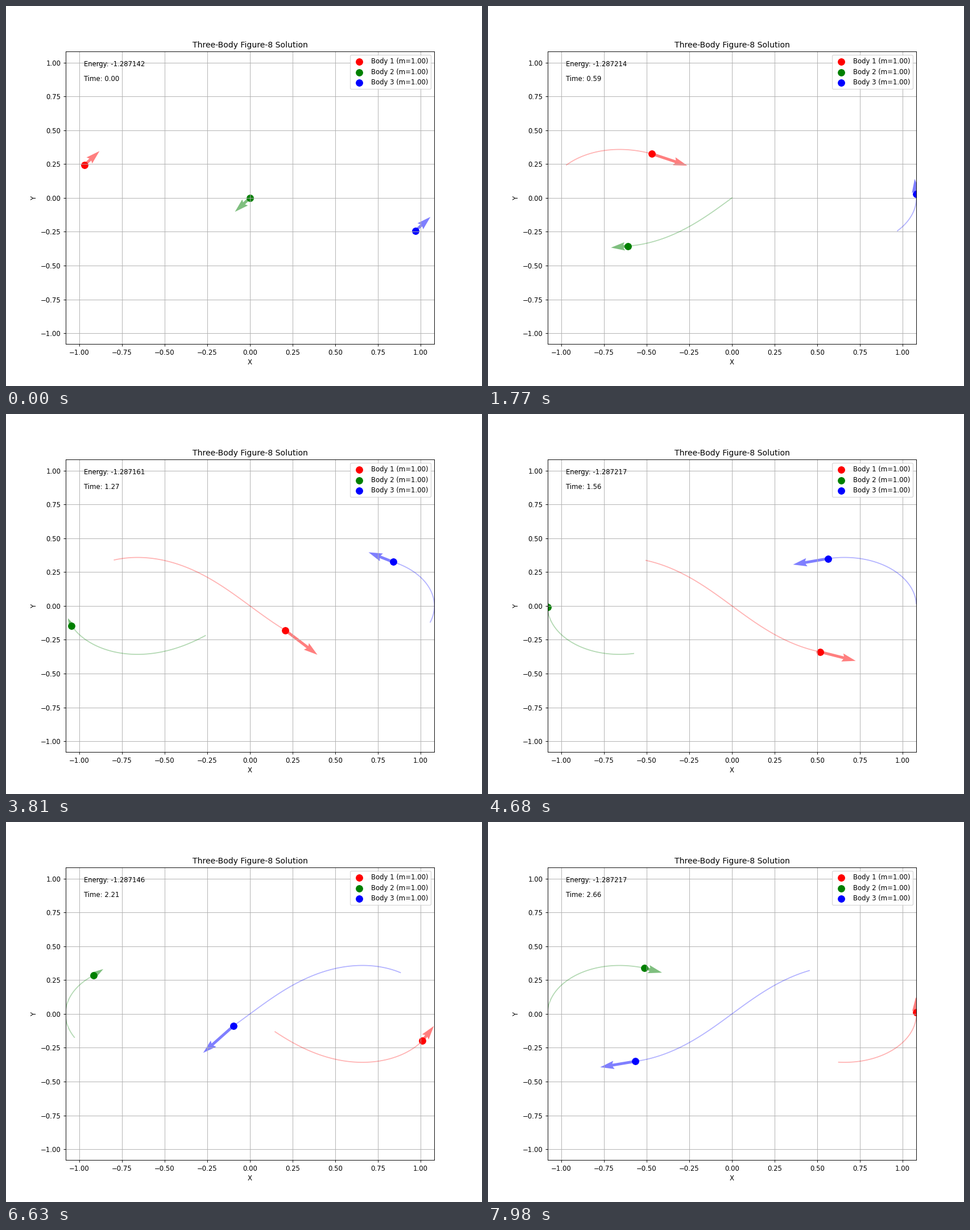
A matplotlib script that plays this animation: 837 by 669 pixels, repeating every 8000 ms.

```python
import numpy as np
import matplotlib.pyplot as plt
from matplotlib.animation import FuncAnimation

WIDTH, HEIGHT, DPI = 837, 669, 83.7
FRAMES, LOOP_MS = 267, 8000
DT, STEPS, TRAIL = 0.01, 700, 100
COLORS = ["red", "green", "blue"]
PAIRS = [(0, 1), (0, 2), (1, 2)]


def acceleration(pos):
    acc = np.zeros_like(pos)
    for i, j in PAIRS:
        d = pos[j] - pos[i]
        pull = d / np.hypot(*d) ** 3
        acc[i] += pull
        acc[j] -= pull
    return acc


def energy(pos, vel):
    potential = -sum(1 / np.hypot(*(pos[j] - pos[i])) for i, j in PAIRS)
    return 0.5 * np.sum(vel ** 2) + potential


def simulate():
    """Velocity Verlet run of three unit masses on the figure-8 orbit."""
    start = np.array([-0.97000436, 0.24308753])
    swing = np.array([0.466203685, 0.43236573])
    pos = np.array([start, 0 * start, -start])
    vel = np.array([swing, -2 * swing, swing])
    acc = acceleration(pos)
    path, speeds = [pos], [vel]
    for _ in range(STEPS):
        pos = pos + vel * DT + 0.5 * acc * DT ** 2
        new_acc = acceleration(pos)
        vel = vel + 0.5 * (acc + new_acc) * DT
        acc = new_acc
        path.append(pos)
        speeds.append(vel)
    return np.array(path), np.array(speeds)


path, velocity = simulate()
limit = np.abs(path).max()

# the tiny margin keeps the pixel size from rounding down
fig, ax = plt.subplots(figsize=((WIDTH + 0.001) / DPI, (HEIGHT + 0.001) / DPI), dpi=DPI)
ax.set_xlim(-limit, limit)
ax.set_ylim(-limit, limit)
ax.set_xlabel("X")
ax.set_ylabel("Y")
ax.set_title("Three-Body Figure-8 Solution")
ax.grid(True)

bodies, trails, arrows = [], [], []
for k, color in enumerate(COLORS):
    (x, y), (u, v) = path[0, k], velocity[0, k]
    bodies.append(ax.scatter([x], [y], s=100, c=color, label=f"Body {k + 1} (m=1.00)"))
    trails.append(ax.plot([], [], "-", color=color, alpha=0.3)[0])
    # each arrow is scaled so that it starts at 1/18 of the axes width
    arrows.append(ax.quiver([x], [y], [u], [v], color=color, alpha=0.5,
                            scale=18 * np.hypot(u, v)))

energy_text = ax.text(0.05, 0.95, "", transform=ax.transAxes)
time_text = ax.text(0.05, 0.90, "", transform=ax.transAxes)
ax.legend(loc="upper right")


def update(n):
    first = max(0, n - TRAIL)
    for k in range(3):
        spot = path[n, k]
        bodies[k].set_offsets([spot])
        trails[k].set_data(path[first:n + 1, k, 0], path[first:n + 1, k, 1])
        arrows[k].set_offsets([spot])
        arrows[k].set_UVC(velocity[n, k, :1], velocity[n, k, 1:])
    energy_text.set_text(f"Energy: {energy(path[n], velocity[n]):.6f}")
    time_text.set_text(f"Time: {n * DT:.2f}")
    return bodies + trails + arrows + [energy_text, time_text]


def reset():
    return update(0)


anim = FuncAnimation(fig, update, frames=FRAMES, init_func=reset,
                     interval=LOOP_MS / FRAMES, repeat=True, repeat_delay=0, blit=False)
plt.show()
```
